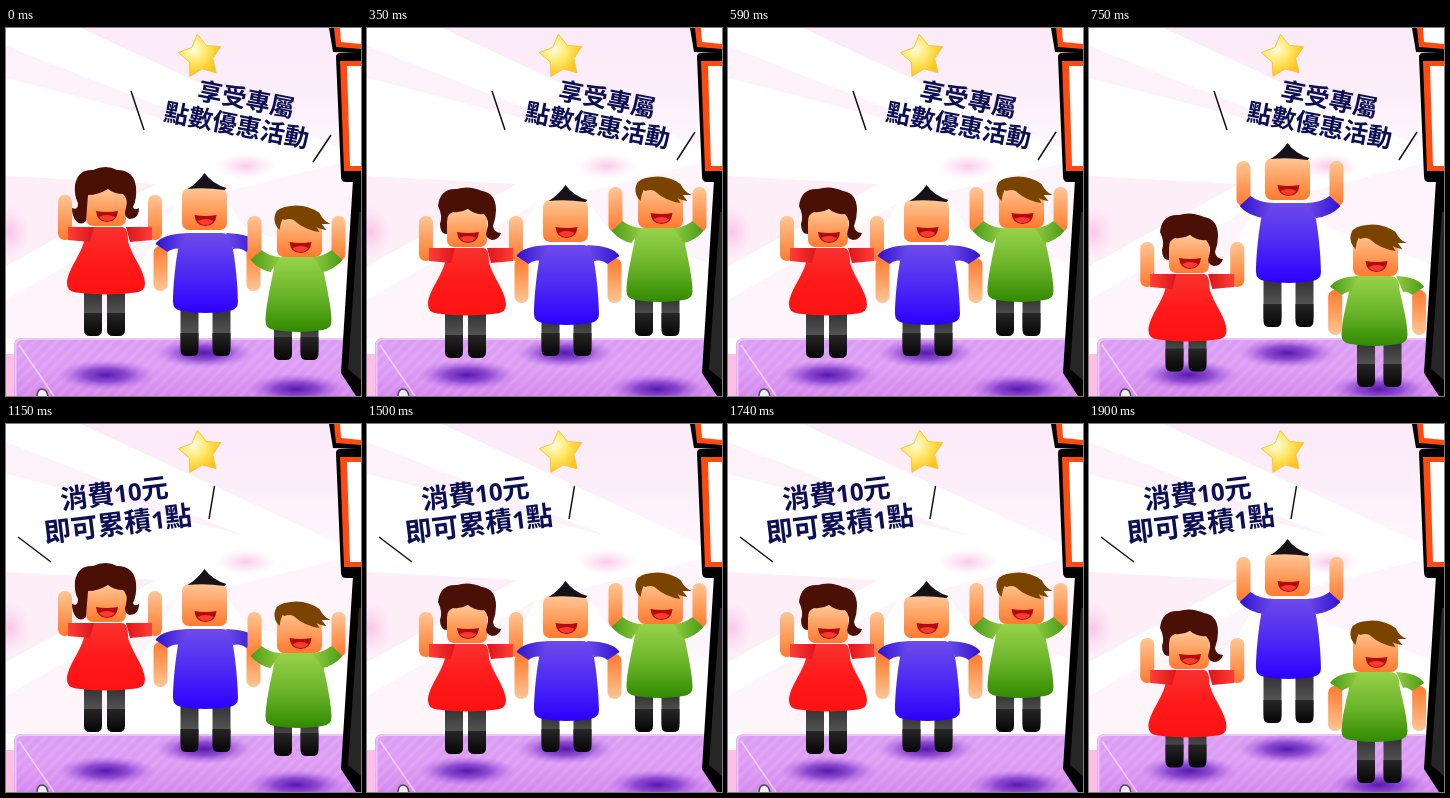
These frames come from a looping animation (355 by 368 pixels, 2.3 s). An HTML page:

```html
<!DOCTYPE html>
<html lang="zh-Hant">
<head>
<meta charset="utf-8">
<title>點數優惠</title>
<style>
  html, body { margin: 0; width: 100%; height: 100%; overflow: hidden; background: #fff; }
  svg { display: block; width: 355px; height: 368px; }
  text { font-family: "Noto Sans CJK TC", "Noto Sans CJK", "Noto Sans CJK JP", sans-serif; font-weight: 700; fill: #0d0f55; text-anchor: middle; }
  .digits { font-family: "Open Sans", "Noto Sans", sans-serif; font-stretch: condensed; font-size: 24px; }
  .tick { stroke: #111; stroke-width: 1.5; }
</style>
</head>
<body>
<svg viewBox="0 0 355 368">
  <defs id="defs">
    <pattern id="stripes" width="8" height="8" patternUnits="userSpaceOnUse" patternTransform="rotate(45)">
      <rect width="3.5" height="8" fill="#fff" opacity=".1"/>
    </pattern>
    <radialGradient id="cloud"><stop stop-color="#f9b4e2" stop-opacity=".7"/><stop offset="1" stop-color="#fbc9ea" stop-opacity="0"/></radialGradient>
    <radialGradient id="shadow"><stop stop-color="#5518ae"/><stop offset=".45" stop-color="#7a35c8" stop-opacity=".8"/><stop offset="1" stop-color="#b068e4" stop-opacity="0"/></radialGradient>
    <radialGradient id="gold" cx=".35" cy=".35" r=".65"><stop stop-color="#fffde0"/><stop offset=".5" stop-color="#ffe766"/><stop offset="1" stop-color="#fcc21a"/></radialGradient>
  </defs>

  <g id="backdrop">
    <rect width="355" height="368" fill="#fff"/>
    <path d="M75 0H355V130Z" fill="url(#sky)"/>
    <path d="M0 18L240 112 0 50Z" fill="#fdf1fa"/>
    <path d="M0 148L150 156 0 238Z" fill="#fdeef8"/>
    <path d="M0 272L170 175 90 310H0Z" fill="#fef5fb"/>
    <path d="M215 165L355 130V240L240 200Z" fill="#fef4fb"/>
    <g fill="url(#cloud)">
      <ellipse cx="4" cy="204" rx="20" ry="26"/>
      <ellipse cx="240" cy="138" rx="30" ry="13"/>
    </g>
  </g>

  <g id="platform">
    <path d="M0 326H10V368H0Z" fill="#fdbfe6"/>
    <path d="M8 368V318Q8 310 16 310H355V368Z" fill="url(#stage)"/>
    <path d="M8 368V318Q8 310 16 310H355V368Z" fill="url(#stripes)"/>
    <path d="M9.5 368V318Q9.5 311 17 311H345" fill="none" stroke="#efc4fa" stroke-width="2"/>
    <path d="M13 317L48 368" stroke="#fbe6ff" stroke-width="1.5" opacity=".7"/>
    <path d="M31 369Q31 361 36 361T42 369Z" fill="#eee" stroke="#55445f" stroke-width="1.5"/>
    <g fill="url(#shadow)">
      <ellipse cx="100" cy="347" rx="49" ry="15"/>
      <ellipse cx="198" cy="325" rx="49" ry="15"/>
      <ellipse cx="290" cy="361" rx="49" ry="15"/>
    </g>
  </g>

  <g id="sign">
    <path d="M323 0H355V25L327 24Z"/>
    <path d="M328 0H355V21L330 19Z" fill="#ff4a10"/>
    <path d="M334 0H355V16L335 14Z" fill="#fff"/>
    <path d="M330 29Q330 25 334 25L355 24V154H340Q335 154 335 148Z"/>
    <path d="M334 33H355V143H338Z" fill="#ff4a10"/>
    <path d="M341 38H355V138H344Z" fill="#fff"/>
    <path d="M347 152H355V368H350L335 345Z"/>
    <path d="M353 184H355V352L342 341Z" fill="#262626"/>
  </g>

  <path id="star" fill="url(#gold)" stroke="#f9c63c" stroke-linejoin="round"/>

  <g id="offer">
    <g font-size="24.5">
      <text transform="translate(238.5 80) rotate(11)">享受專屬</text>
      <text transform="translate(229 106) rotate(11)">點數優惠活動</text>
    </g>
    <path class="tick" d="M125 63L138 102"/>
  </g>
  <g id="rule">
    <g font-size="27">
      <text transform="translate(109.500 79) rotate(-7)">消費<tspan class="digits">10</tspan>元</text>
      <text transform="translate(113 109.500) rotate(-7)">即可累積<tspan class="digits">1</tspan>點</text>
    </g>
    <path class="tick" d="M12 113L45 138"/>
  </g>
  <path id="offerTickLow" class="tick" d="M325 107L307 134"/>
  <path id="offerTick" class="tick" d="M328 104L310 132"/>
  <path id="ruleTickLow" class="tick" d="M208.500 62L203 95"/>
  <path id="ruleTick" class="tick" d="M207.500 62L202 95"/>

  <g id="poses"></g>
</svg>

<script>
const LOOP = 2300;
const STEPS = [0, 350, 750, 1150, 1500, 1900];
const $ = id => document.getElementById(id);

const gradient = (id, colors, axis) => `<linearGradient id="${id}" ${axis}>${colors.map((c, i) =>
  `<stop offset="${i / (colors.length - 1)}" stop-color="${c}"/>`).join('')}</linearGradient>`;
const vertical = {
  sky: ['#fbeaf8', '#fdeffa', '#fff8fd'],
  stage: ['#d99df3', '#dd9cf4', '#d488ee'],
  skin: ['#ffc696', '#ff9f5e', '#ff7a30'],
  skinDown: ['#ff7a30', '#ff9f5e', '#ffc696'],
  red: ['#f8322e', '#ff1a1a', '#fd1212'],
  purple: ['#6d4bea', '#4d2af4', '#2c00ff'],
  green: ['#98d24a', '#6cb52a', '#318a00'],
  trousers: ['#303030', '#686868'],
  boots: ['#262626', '#050505'],
};
const sleeves = {
  redSleeve: ['#dc141a', '#ff3e36'],
  purpleSleeve: ['#6d4bea', '#2f12d0'],
  greenSleeve: ['#90cc42', '#4a9a16'],
};
$('defs').insertAdjacentHTML('beforeend',
  Object.entries(vertical).map(([id, c]) => gradient(id, c, 'x2="0" y2="1"')).join('') +
  Object.entries(sleeves).map(([id, c]) => gradient(id, c, '')).join(''));

$('star').setAttribute('d', 'M' + Array.from({ length: 10 }, (_, i) => {
  const angle = (-98 + i * 36) * Math.PI / 180, r = i % 2 ? 12.5 : 22.5;
  return [194.5 + r * Math.cos(angle), 28.5 + r * Math.sin(angle)].map(v => v.toFixed(1));
}).join('L') + 'Z');

const box = (x, y, w, h, r, fill) =>
  `<rect x="${x}" y="${y}" width="${w}" height="${h}" rx="${r}" fill="${fill}"/>`;
const shape = (d, fill) => `<path d="${d}" fill="${fill}"/>`;

// Hair is drawn relative to the middle of the top edge of the face.
const hair = {
  curls: shape('M-20 32Q-25 37-30 32-34 27-34 19-28 22-28 14-32 7-31-4-28-20-13-19 0-25 11-19 28-19 30-2 31 10 27 18 28 22 33 19 33 30 23 30 17 27 20 19 22 9 17 5 8 5 2 0-8 6-18 6-20 14Z', '#4a1005'),
  swept: shape('M-20 24Q-27 24-27 14-24 6-29-4-27-22-10-21 2-25 15-19 29-17 29 0 29 8 26 16 27 23 34 23 32 30 25 30 17 28 20 20 23 10 17 4 8 5 1-1-6 3-14 2-20 4-20 12Z', '#4a1005'),
  spike: shape('M-17 1Q-7-5 0-15 8-4 22 0L20 2Q0-1-17 1Z', '#17121a'),
  fringe: shape('M-25 2Q-24-6-15-8 5-13 20-2 24 6 31 9L22 9 27 15Q20 14 17 12L20 17Q5 15-6 5-10 3-15 5L-17 4Q-19 8-20 15-26 9-25 2Z', '#7a4400'),
};

const mouth = (x, y) => `<g transform="translate(${x} ${y})">
  ${shape('M-11 0Q0 2 11 0 10 11 0 11T-11 0Z', '#b00c0c')}
  ${shape('M-8 6Q0 2 8 6 5 10 0 10T-8 6Z', '#fa3a30')}</g>`;

const leg = (x, hip, foot) => box(x, hip, 18, foot - hip - 8, 0, 'url(#trousers)') +
  shape(`M${x} ${foot - 23}H${x + 18}V${foot - 6}Q${x + 18} ${foot} ${x + 12} ${foot}H${x + 6}Q${x} ${foot} ${x} ${foot - 6}Z`, 'url(#boots)');

const torso = ({ x, top, hem, waist: w, flare: f }) =>
  `M${x - 16} ${top}H${x + 16}Q${x + w} ${top} ${x + w} ${top + 14}
   C${x + w + 3} ${top + 28} ${x + f} ${hem - 24} ${x + f} ${hem - 11}Q${x + f} ${hem - 3} ${x + f - 9} ${hem - 2}
   Q${x} ${hem + 2} ${x - f + 9} ${hem - 2}Q${x - f} ${hem - 3} ${x - f} ${hem - 11}
   C${x - f} ${hem - 24} ${x - w - 3} ${top + 28} ${x - w} ${top + 14}Q${x - w} ${top} ${x - 16} ${top}Z`;

// Right sleeves around x = 0; r is the outer edge of the hand.
const sleeveShapes = {
  level: (r, y) => `M16 ${y}H${r - 10}V${y + 13}L20 ${y + 15}Z`,
  up: (r, y) => `M${r - 3} ${y + 3}L${r - 14} ${y - 7}Q${r - 23} ${y} 16 ${y}L26 ${y + 15}Q${r - 12} ${y + 13} ${r - 3} ${y + 3}Z`,
  down: (r, y) => `M${r - 2} ${y + 11}Q${r - 8} ${y + 1} 19 ${y}L26 ${y + 16}Q${r - 20} ${y + 14} ${r - 14} ${y + 19}Z`,
};

function arm(p, side) {
  const skin = p.arms === 'down' ? 'skinDown' : 'skin';
  return `<g transform="translate(${p.armX} 0) scale(${side} 1)">` +
    box(p.reach - 14, p.hands, 14, 45, 6.5, `url(#${skin})`) +
    shape(sleeveShapes[p.arms](p.reach, p.top), `url(#${p.color}Sleeve)`) + '</g>';
}

function person(p) {
  const [fx, fy, fw, fh] = p.face;
  return p.legs.map(x => leg(x, p.hem - 5, p.foot)).join('') +
    shape(torso(p), `url(#${p.color})`) + arm(p, -1) + arm(p, 1) +
    box(fx - fw / 2, fy, fw, fh, 7, 'url(#skin)') +
    `<g transform="translate(${fx} ${fy})">${hair[p.hair]}</g>` +
    mouth(fx + 1, fy + fh - 15);
}

const girl = (dx, dy, foot, style) => person({
  x: 100 + dx, armX: 104 + dx / 2, reach: 52, hands: 167 + dy, arms: 'level',
  top: 199 + dy, hem: 266.5 + dy, waist: 22, flare: 39, foot, legs: [78 + dx, 101 + dx],
  color: 'red', hair: style, face: [100, 161 + dy, 40, 37],
});
const tallBoy = (dy, foot, arms) => person({
  x: 199.5, armX: 201, reach: 53.5, hands: (arms === 'up' ? 163 : 218) + dy, arms,
  top: 205 + dy, hem: 285 + dy, waist: 27, flare: 32.5, foot, legs: [174.5, 206.5],
  color: 'purple', hair: 'spike', face: [198.5, 160 + dy, 45, 42],
});
const shortBoy = (dx, dy, hem, foot, arms) => person({
  x: 292.5 + dx, armX: 290.5 + dx / 3, reach: 49, hands: arms === 'up' ? 188 + dy : 262, arms,
  top: 229 + dy, hem, waist: 25, flare: 33, foot, legs: [268, 294.5],
  color: 'green', hair: 'fringe', face: [293.5 + dx, 187 + dy, 45, 42],
});

const poses = {
  stand: girl(0, 0, 308, 'curls') + tallBoy(0, 328, 'down') + shortBoy(0, 0, 304, 332, 'up'),
  hopRight: girl(0, 21, 330, 'swept') + tallBoy(12, 328, 'down') + shortBoy(0, -29, 274, 308, 'up'),
  hopMiddle: girl(-1.5, 47, 343.5, 'swept') + tallBoy(-30, 299, 'up') + shortBoy(-7, 19, 318, 359, 'down'),
};
$('poses').innerHTML = Object.entries(poses).map(([id, art]) => `<g id="${id}">${art}</g>`).join('');

// One digit per step: 1 shows the part, 0 hides it.
const visible = {
  offer: '111000', rule: '000111',
  offerTickLow: '100000', offerTick: '011000', ruleTickLow: '000100', ruleTick: '000011',
  stand: '100100', hopRight: '010010', hopMiddle: '001001',
};
for (const [id, flags] of Object.entries(visible)) {
  const keys = STEPS.map((time, i) => ({
    offset: time / LOOP, visibility: +flags[i] ? 'visible' : 'hidden', easing: 'step-end',
  }));
  keys.push({ ...keys.at(-1), offset: 1 });
  $(id).animate(keys, { duration: LOOP, iterations: Infinity });
}
</script>
</body>
</html>
```
